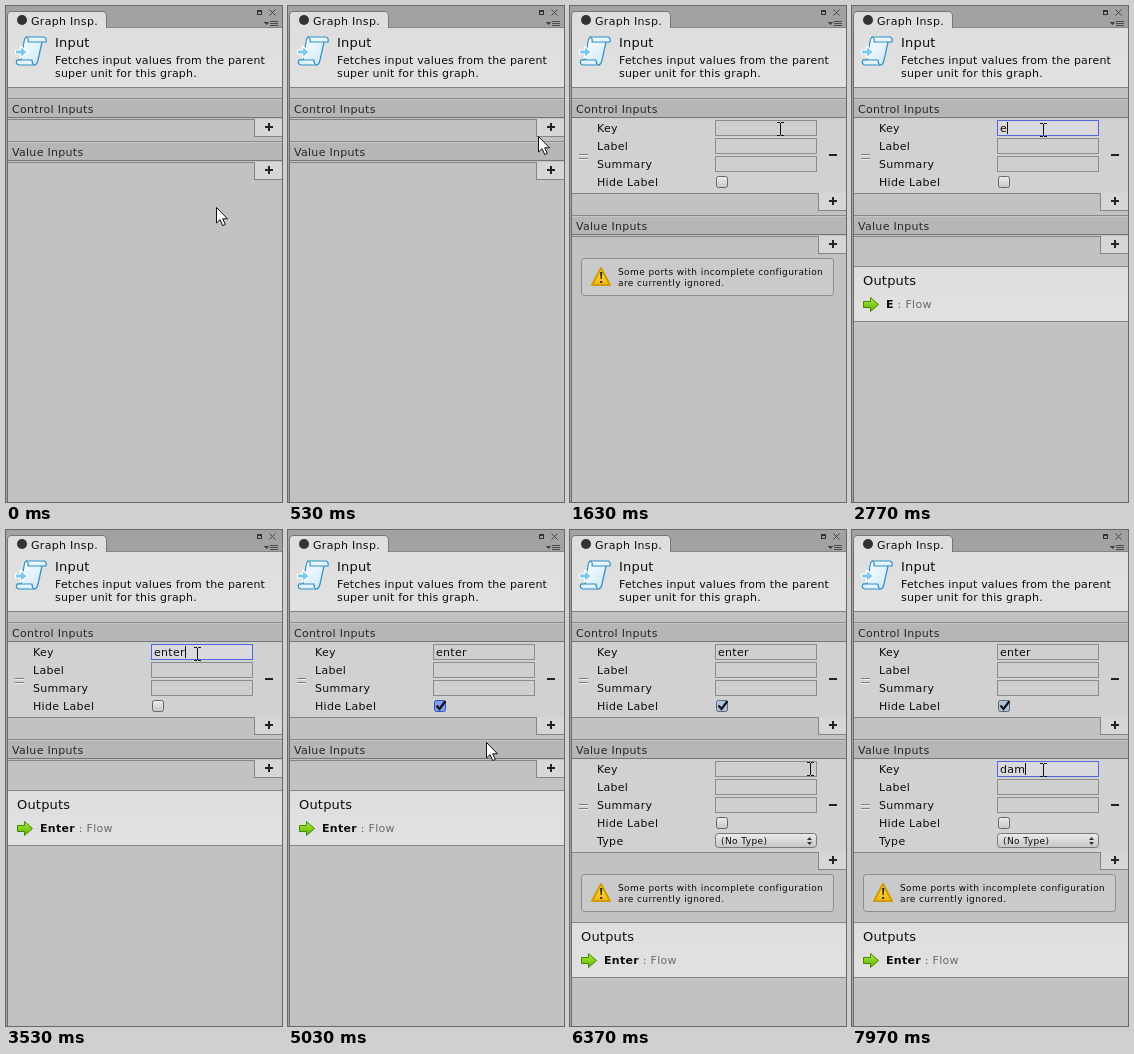
Recreate the animation shown at these times as an HTML page. Size 276 px wide and 496 px high, loop 8 s.

```html
<!DOCTYPE html>
<html lang="en">
<head>
<meta charset="utf-8">
<title>Graph inspector</title>
<style>
  html, body { margin: 0; width: 100%; height: 100%; overflow: hidden; background: #c2c2c2; }
  svg { display: block; width: 276px; height: 496px; }
  text { font: 11px "DejaVu Sans", sans-serif; letter-spacing: .3px; fill: #0c0c0c; white-space: pre; }
  .title { font-size: 13px; letter-spacing: .2px; }
  .summary { letter-spacing: .18px; }
  .small { font-size: 9px; letter-spacing: .4px; }
  .heading { fill: #262626; }
  .name { font-weight: bold; }
  .muted { fill: #6a6a6a; font-weight: normal; }
  .crisp { shape-rendering: crispEdges; }
  /* Custom properties inherit into the <use> copies. */
  .field { fill: var(--field, #cfcfcf); stroke: var(--field-edge, #8c8c8c); }
  .box { fill: var(--box, url(#button)); stroke: var(--box-edge, #666); }
  .tick { opacity: var(--tick, 0); }
  .focus { --field: #d9d9de; --field-edge: #4f66dc; --box: #9db4ea; --box-edge: #3f5cae; }
  .set { --tick: 1; --box: #b3c3d8; --box-edge: #5a6675; }
  .set.focus { --box: #7fa0f0; --box-edge: #2f52b8; }
</style>
</head>
<body>
<svg viewBox="0 0 276 496">
  <defs>
    <linearGradient id="panel" x2="0" y2="1"><stop stop-color="#dedede"/><stop offset="1" stop-color="#e1e1e1"/></linearGradient>
    <linearGradient id="button" x2="0" y2="1"><stop stop-color="#ececec"/><stop offset="1" stop-color="#c6c6c6"/></linearGradient>
    <linearGradient id="paper" x2="1" y2="1"><stop stop-color="#fff"/><stop offset="1" stop-color="#c9e6f7"/></linearGradient>
    <linearGradient id="green" x2="0" y2="1"><stop stop-color="#b5ea3c"/><stop offset="1" stop-color="#59b300"/></linearGradient>
    <linearGradient id="amber" x2="0" y2="1"><stop stop-color="#ffe45c"/><stop offset="1" stop-color="#f5b400"/></linearGradient>
    <g id="bar" class="crisp">
      <path fill="#b6b6b6" d="M2-1h274v20H2z"/>
      <path fill="#8a8a8a" d="M2-1h274v1H2z"/>
      <path fill="#c6c6c6" d="M2 0h274v1H2z"/>
      <path fill="#757575" d="M2 18h274v1H2z"/>
    </g>
    <g id="add" class="crisp">
      <path fill="#858585" d="M2 0h247v1H2z"/>
      <path fill="#d6d6d6" d="M249 0h27v17h-27z"/>
      <path fill="#858585" d="M248 0h1v17h28v1h-29z"/>
      <path fill="#222" d="M259 7h8v2h-8zM262 4h2v8h-2z"/>
    </g>
    <g id="rows">
      <text x="27" y="33">Key</text>
      <text x="27" y="51">Label</text>
      <text x="27" y="69">Summary</text>
      <text x="27" y="87">Hide Label</text>
      <g class="crisp">
        <rect class="field" x="145.5" y="39.5" width="101" height="15"/>
        <rect class="field" x="145.5" y="57.5" width="101" height="15"/>
      </g>
    </g>
    <rect id="key-field" class="field crisp" x="145.5" y="21.5" width="101" height="15"/>
    <g id="check">
      <rect class="box" x="146.5" y="77.5" width="11" height="11" rx="2"/>
      <path class="tick" d="M148.500 82.500l3 3.500 6-8" fill="none" stroke="#101018" stroke-width="2.2"/>
    </g>
    <g id="grip" class="crisp">
      <path fill="#7d7d7d" d="M9 1h9v1H9zM9 5h9v1H9z"/>
      <path fill="#eee" d="M9 2h9v1H9zM9 6h9v1H9z"/>
      <path fill="#222" d="M259 1h8v2h-8z"/>
    </g>
  </defs>

  <path fill="#c2c2c2" d="M0 0h276v496H0z"/>
  <path fill="#a2a2a2" d="M0 0h276v22H0z"/>
  <path fill="url(#panel)" d="M2 22h274v59H2z"/>
  <path d="M1.5 22V9q0-3.500 3.500-3.500H97q3 0 3.500 3.500V22" fill="#dedede" stroke="#777"/>
  <path class="crisp" fill="#858585" d="M101 21h175v1H101zM2 81h274v1H2z"/>
  <path class="crisp" fill="#6d6d6d" d="M1 22h1v474H1z"/>
  <path class="crisp" fill="#a2a2a2" d="M0 22h1v474H0z"/>
  <circle cx="16" cy="14" r="5" fill="#333"/>
  <text x="25" y="19">Graph Insp.</text>
  <g class="crisp">
    <path d="M251.500 4.500h4v4h-4z" fill="none" stroke="#333"/>
    <path d="M251 4h5v2h-5z" fill="#333"/>
    <path d="M258 16h5l-2.500 3z" fill="#444"/>
    <path d="M264 15h8v1h-8zM264 17h8v1h-8zM264 19h8v1h-8z" fill="#4c4c4c"/>
  </g>
  <path d="M263.500 3.500l6 6M269.500 3.500l-6 6" stroke="#444"/>
  <g stroke="#2f8fc6" stroke-width="1.200" stroke-linejoin="round">
    <path fill="url(#paper)" d="M20 31H38q3 1 2 5H36l-4 18q-1 5-4 5H13q-4-1-2-5h4l3-18q.5-4 2-5z"/>
    <path fill="#e9f6fd" d="M20 31q3 1 2 5h14M11 54h15q0 4 2 5"/>
    <path fill="#7dc8ee" d="M9.500 44h5v-4l7 6-7 6v-4h-5z" stroke="#fff"/>
  </g>
  <text class="title" x="49" y="41">Input</text>
  <text class="summary" x="49" y="58">Fetches input values from the parent</text>
  <text class="summary" x="49" y="71">super unit for this graph.</text>

  <g transform="translate(0 93)">
    <use href="#bar"/>
    <text class="heading" x="6" y="14">Control Inputs</text>
    <g id="control-body">
      <path fill="#d1d1d1" d="M2 19h274v75H2z"/>
      <use href="#rows"/>
      <use href="#grip" y="54"/>
      <g id="control-key"><use href="#key-field"/><text x="148" y="33"></text><path class="caret crisp" fill="#111" d="M0 23h1v12H0z"/></g>
      <g id="control-check"><use href="#check"/></g>
    </g>
    <use id="control-add" href="#add"/>
  </g>

  <g id="value">
    <use href="#bar"/>
    <text class="heading" x="6" y="14">Value Inputs</text>
    <g id="value-body">
      <path fill="#d1d1d1" d="M2 19h274v93H2z"/>
      <use href="#rows"/>
      <use href="#grip" y="63"/>
      <g id="value-key"><use href="#key-field"/><text x="148" y="33"></text><path class="caret crisp" fill="#111" d="M0 23h1v12H0z"/></g>
      <use href="#check"/>
      <text x="27" y="105">Type</text>
      <rect x="145.500" y="93.500" width="101" height="14" rx="3" fill="url(#button)" stroke="#777"/>
      <text class="small" x="151" y="104">(No Type)</text>
      <path d="M237 100l2.500-3 2.500 3zM237 102l2.500 3 2.500-3z" fill="#333"/>
    </g>
    <use id="value-add" href="#add"/>
  </g>

  <g id="warning">
    <rect x="11.500" y=".5" width="252" height="37" rx="3" fill="#cacaca" stroke="#8c8c8c"/>
    <path d="M31 10l9 17H22z" fill="url(#amber)" stroke="#d09a00" stroke-width="2" stroke-linejoin="round"/>
    <path d="M30 14h2.400l-.6 7h-1.200zM30 23h2.200v2H30z" fill="#333"/>
    <text class="small" x="48" y="17">Some ports with incomplete configuration</text>
    <text class="small" x="48" y="28">are currently ignored.</text>
  </g>

  <g id="outputs">
    <path fill="url(#panel)" d="M2 0h274v55H2z"/>
    <path class="crisp" fill="#858585" d="M2-1h274v1H2zM2 54h274v1H2z"/>
    <text class="title" x="11" y="18">Outputs</text>
    <path d="M11.500 34.500h7v-4l8 7-8 7v-4h-7z" fill="url(#green)" stroke="#3f8a00" stroke-linejoin="round"/>
    <text class="name" x="34" y="41"><tspan id="port"></tspan><tspan class="muted"> : Flow</tspan></text>
  </g>

  <g id="pointer">
    <path id="arrow" d="M.5.5v15.500l3.600-3.400 2.600 6 2.600-1.200-2.600-5.600h4.800z" fill="#fff" stroke="#111"/>
    <path id="beam" class="crisp" fill="#111" d="M-2-7h3v1h-3zM2-7h3v1H2zM1-6h1V6H1zM-2 6h3v1h-3zM2 6h3v1H2z"/>
  </g>
</svg>
<script>
const LOOP = 8000;
const $ = id => document.getElementById(id);
const show = (el, on) => { el.style.display = on ? '' : 'none'; };
const moveY = (id, y) => $(id).setAttribute('transform', `translate(0 ${y})`);
const during = (t, from, to) => t >= from && t < to;

// start, end, target x, target y, ease-out power for x and y
const moves = [
  [0, 830, 259, 119, 1.67, 1.97],
  [1340, 1800, 190, 124, 1.3, 1.3],
  [3530, 3600, 186, 125, 1, 1],
  [3800, 4200, 153, 179, 1.5, 1.5],
  [4840, 5670, 259, 238, 2.1, 3.1],
  [6240, 6730, 190, 240, 1.1, 1.1]
];

function pointerAt(t) {
  let x = 210, y = 201;
  for (const [from, to, toX, toY, powX, powY] of moves) {
    if (t < from) break;
    const left = 1 - Math.min(1, (t - from) / (to - from));
    x = toX + (x - toX) * left ** powX;
    y = toY + (y - toY) * left ** powY;
  }
  return [Math.round(x), Math.round(y)];
}

const typed = (word, times, t) => word.slice(0, times.filter(at => t >= at).length);

function drawKey(id, value, focused) {
  const group = $(id), text = group.querySelector('text'), caret = group.querySelector('.caret');
  text.textContent = value;
  group.classList.toggle('focus', focused);
  show(caret, focused);
  const end = value ? text.getComputedTextLength() : 0;
  caret.setAttribute('transform', `translate(${Math.round(148 + end)} 0)`);
}

function render(t) {
  const controlOpen = t >= 1170, valueOpen = t >= 6030;
  const controlKey = typed('enter', [2770, 2930, 3070, 3300, 3530], t);
  const valueKey = typed('dam', [7630, 7830, 7970], t);

  show($('control-body'), controlOpen);
  show($('value-body'), valueOpen);
  moveY('control-add', controlOpen ? 94 : 20);
  moveY('value-add', valueOpen ? 112 : 20);
  moveY('value', controlOpen ? 210 : 136);
  show($('warning'), controlOpen && !controlKey || valueOpen);
  moveY('warning', valueOpen ? 344 : 252);
  show($('outputs'), controlKey);
  moveY('outputs', valueOpen ? 393 : 261);
  $('port').textContent = controlKey.charAt(0).toUpperCase() + controlKey.slice(1);

  drawKey('control-key', controlKey, during(t, 1970, 4500));
  drawKey('value-key', valueKey, t >= 6930);
  $('control-check').classList.toggle('focus', during(t, 4500, 5900));
  $('control-check').classList.toggle('set', t >= 4670);

  const [x, y] = pointerAt(t);
  const inFields = top => during(y, top, top + 52) && (y - top) % 18 < 16;
  const overField = during(x, 145, 247) && (controlOpen && inFields(114) || valueOpen && inFields(231));
  const pressed = during(t, 1970, 2130) || during(t, 6930, 7070);
  show($('beam'), overField && !pressed);
  show($('arrow'), !overField || pressed);
  $('pointer').setAttribute('transform', `translate(${x} ${y})`);
}

const origin = performance.now();
function tick() {
  render((performance.now() - origin) % LOOP);
  requestAnimationFrame(tick);
}
tick();
</script>
</body>
</html>
```
